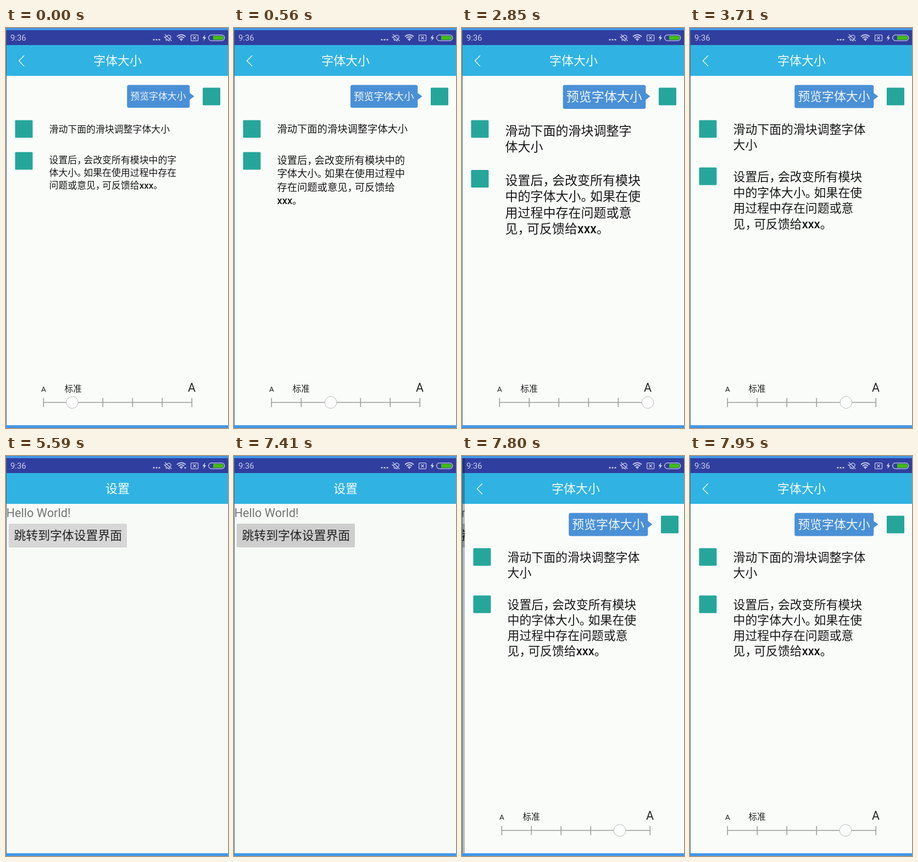
An HTML page for the animation above (8000 ms loop, 404 by 727 pixels).

```html
<!DOCTYPE html>
<html lang="zh-CN">
<head>
<meta charset="utf-8">
<title>字体大小</title>
<style>
html, body { margin: 0; width: 100%; height: 100%; overflow: hidden; background: #4496e6; }
svg { display: block; position: absolute; left: 0; top: 0; }
text { font-family: "Noto Sans CJK SC", "Noto Sans CJK", "Noto Sans", sans-serif; white-space: pre; }
.latin { font-family: Roboto, "Noto Sans", sans-serif; }
.medium { font-weight: 500; }
</style>
</head>
<body>
<svg width="404" height="727" viewBox="0 0 404 727">
  <defs><clipPath id="screen"><rect x="1" y="4" width="403" height="718"/></clipPath></defs>
  <rect width="404" height="727" fill="#4496e6"/>
  <rect y="4" width="1" height="718" fill="#336f90"/>
  <g id="pages" clip-path="url(#screen)"></g>
  <g id="status" fill="none" stroke="#c3c8e8" stroke-width="1.3">
    <text class="latin" x="8" y="23.3" font-size="14.8" fill="#c9cdea" stroke="none">9:36</text>
    <path d="M267.5 21.3h3m2 0h3m2 0h3" stroke-width="2.6"/>
    <path d="M289 20.5q3-2 3-5q1-4 5-3q3 1 2 5q-1 2 1 4zM293 23h4" transform="rotate(35 295 17.5)"/>
    <path d="M289 11.5l12.5 12"/>
    <path d="M311 15.5q8-6.5 16 0M313.8 18.2q5.2-4.2 10.4 0M316.4 20.8q2.6-2 5.2 0" stroke-width="1.9"/>
    <path d="M317.5 21.5h3l-1.5 2z" fill="#c3c8e8" stroke-width=".6"/>
    <path id="mark" d="M323.5 20.5h5l-2.5 3z" fill="#c3c8e8" stroke="none"/>
    <rect x="336.6" y="12.6" width="13" height="10.8" rx="1.5"/>
    <path d="M340.3 15.2l5.6 5.6m0-5.6l-5.6 5.6"/>
    <path d="M362.3 12l-4.8 6.4h3l-1.3 5.2 5-6.6h-3z" fill="#d6daf2" stroke="none"/>
    <rect x="368.7" y="12.7" width="29" height="10.4" rx="5"/>
    <path d="M377 14.2h15.5a3.7 3.7 0 0 1 0 7.4H377z" fill="#43bd12" stroke="none"/>
  </g>
</svg>
<script>
const DURATION = 8000, WRAP = 248, PUNCT = 0.72;
const HINT = "滑动下面的滑块调整字体大小";
const NOTE = "设置后，会改变所有模块中的字体大小。如果在使用过程中存在问题或意见，可反馈给xxx。";

// size, line height, first line centres, second avatar top, bubble height
const look = (size, lead, y1, y2, avatar, bubble) => ({ size, lead, y1, y2, avatar, bubble });
const NORMAL = look(16.9, 23, 184, 240, 225, 41.5);
const MEDIUM = look(18.3, 24.4, 184, 241, 225, 41.5);
const LARGE = look(19.7, 25.9, 183, 264, 247, 42);
const HUGE = look(21.9, 28.5, 184.5, 271, 253, 42);
const MAX = look(23, 29.5, 187, 277, 257.5, 43.5);
const SAVED = look(21.9, 28, 184.5, 270.3, 253, 42);

const STEPS = [
  { at: 0, look: NORMAL, knob: 120.5 },
  { at: 560, look: MEDIUM, knob: 176 },
  { at: 1330, look: LARGE, knob: 230 },
  { at: 2580, look: LARGE, knob: 270 },
  { at: 2730, look: HUGE, knob: 306 },
  { at: 2850, look: MAX, knob: 338 },
  { at: 3560, look: MAX, knob: 314 },
  { at: 3710, look: HUGE, knob: 284 },
  { at: 5590, button: "#d6d7d6", mark: true },
  { at: 6570, button: "#d6d7d6" },
  { at: 7410, button: "#cdcecd" },
  { at: 7530, button: "#c5c6c5" },
  { at: 7680, button: "#c5c6c5", look: SAVED, knob: 283, slide: 120 },
  { at: 7800, button: "#c5c6c5", look: SAVED, knob: 283, slide: 4 },
  { at: 7950, look: SAVED, knob: 283 }
];

const rect = (x, y, w, h, fill, r = 0) =>
  `<rect x="${x}" y="${y}" width="${w}" height="${h}" rx="${r}" fill="${fill}"/>`;
const group = (dx, body) => `<g transform="translate(${dx} 0)">${body}</g>`;
const avatar = (x, y) => rect(x + 0.5, y + 0.5, 32, 32, "#26a69a", 1.5);

// Text placed by the middle of its line; punctuation is set tighter.
function label(str, x, mid, size, fill, extra = "") {
  const body = str.replace(/([，。])(.)/g, `$1<tspan dx="${PUNCT - 1}em">$2</tspan>`)
    .replace("xxx", '<tspan class="latin medium">xxx</tspan>');
  return `<text x="${x}" y="${mid + size * 0.33}" font-size="${size}" fill="${fill}" ${extra}>${body}</text>`;
}

const latin = (str, x, y, size, fill) =>
  `<text class="latin" x="${x}" y="${y}" font-size="${size}" fill="${fill}">${str}</text>`;

function wrap(str, size) {
  const lines = [""];
  let width = 0;
  for (const part of str.match(/xxx。|.[，。]?/g)) {
    const w = size * (part[0] === "x" ? 1.5 + PUNCT : part.length > 1 ? 1 + PUNCT : 1);
    if (width + w > WRAP) { lines.push(""); width = 0; }
    lines[lines.length - 1] += part;
    width += w;
  }
  return lines;
}

const paragraph = (str, mid, { size, lead }) =>
  wrap(str, size).map((line, i) => label(line, 78.5, mid + i * lead, size, "#181818")).join("");

const frame = (title, fill) =>
  rect(1, 4, 404, 718, fill) + rect(1, 4, 404, 27, "#303f9f") + rect(1, 31, 404, 56, "#30b3e2") +
  label(title, 203, 60, 22, "#f4fbfe", 'text-anchor="middle"');

function slider(knob) {
  let d = "M68 680.5H338";
  for (let i = 0; i < 6; i++) d += `M${68.3 + i * 54} 672.5v16.5`;
  return latin("A", 64, 661, 13.5, "#222") + label("标准", 106.6, 655.5, 15.6, "#222") +
    latin("A", 331, 661, 21.5, "#222") +
    `<path d="${d}" stroke="#999" stroke-width="1.5"/>` +
    `<circle cx="${knob}" cy="680.5" r="10.8" fill="#fdfdfd" stroke="#bcbcbc"/>`;
}

function chat({ look: l, knob }) {
  const left = 321.7 - 6 * l.size;
  return frame("字体大小", "#fafcfa") +
    '<path d="M33 50L23.5 59.7L33 69.3" fill="none" stroke="#e4f5fc" stroke-width="1.5"/>' +
    rect(left, 103.6, 334.3 - left, l.bubble, "#4a90d6", 3.5) +
    '<path d="M333.5 117.5L342.5 124.3L333.5 131z" fill="#4a90d6"/>' +
    label("预览字体大小", left + 6, 104 + l.bubble / 2, l.size, "#f0f6fc") +
    avatar(357.5, 108) + avatar(16, 167) + avatar(16, l.avatar) +
    paragraph(HINT, l.y1, l) + paragraph(NOTE, l.y2, l) + slider(knob);
}

const settings = ({ button }) =>
  frame("设置", "#f8faf8") + latin("Hello World!", 0.5, 111, 21.7, "#757575") +
  rect(5, 164, 215, 2, "#c9cac9", 2) + rect(5, 123, 215, 42, button, 2) +
  label("跳转到字体设置界面", 14.5, 144.8, 21.85, "#222");

function draw(step) {
  let body;
  if (step.slide) {
    body = rect(1, 4, 404, 718, "#f8faf8") +
      group(-0.22 * (404 - step.slide), settings(step) + rect(405, 31, 100, 56, "#30b3e2")) +
      rect(1, 4, 404, 718, "rgba(0,0,0,.26)") + group(step.slide, chat(step));
  } else {
    body = step.look ? chat(step) : settings(step);
  }
  document.getElementById("pages").innerHTML = body;
  document.getElementById("mark").style.display = step.mark ? "" : "none";
}

const start = performance.now();
let shown;
function tick() {
  const t = (performance.now() - start) % DURATION;
  const step = STEPS.filter(s => s.at <= t).pop();
  if (step !== shown) draw(shown = step);
  requestAnimationFrame(tick);
}
tick();
</script>
</body>
</html>
```
